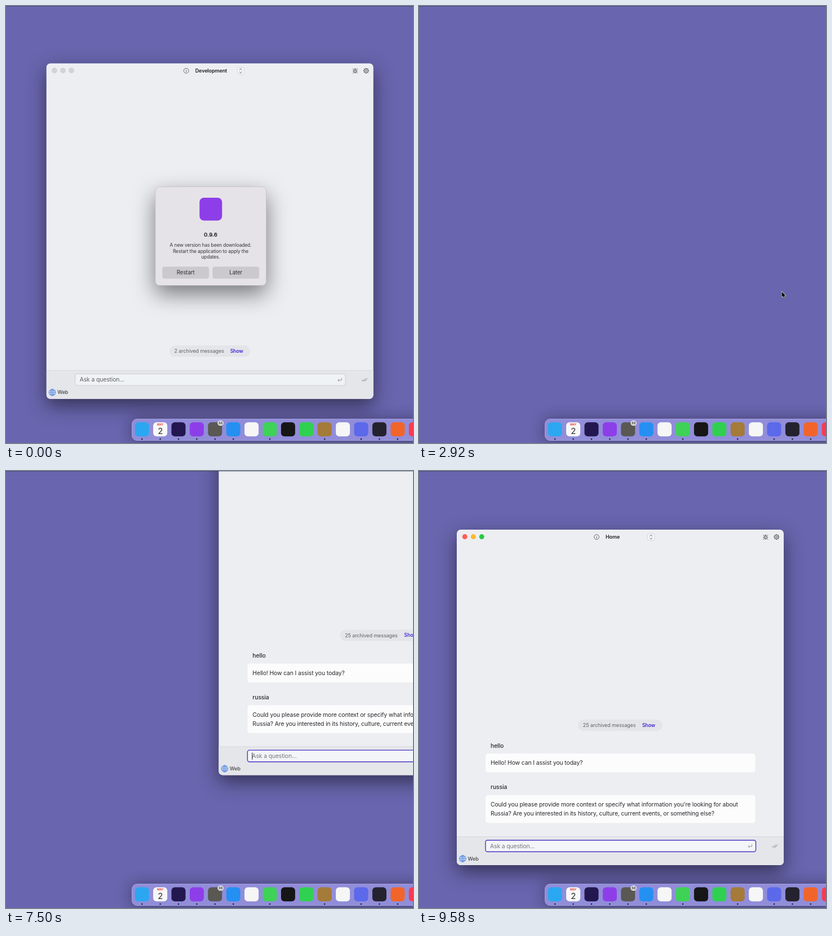
Animation of 722 by 775 pixels, one loop 9.98 s. Source, as an HTML page with a canvas:

```html
<!DOCTYPE html>
<html lang="en">
<head>
<meta charset="utf-8">
<title>Update and restart</title>
<style>
html, body { margin: 0; width: 100%; height: 100%; overflow: hidden; background: #6965ae; }
canvas { display: block; }
</style>
</head>
<body>
<canvas id="stage" width="722" height="775"></canvas>
<script>
const ctx = document.getElementById('stage').getContext('2d');
const LOOP = 9980;
const STEPS_PER_MS = 0.012;

// Times below are in steps of 1/12 s.
const ARRIVE = 13, REST = 19, PRESS = 25, DIALOG_GONE = 29, WINDOW_GONE = 30, LEFT = 36;
const REOPEN = 74, LOADED = 79, DRAG = 89, CURSOR_HIDE = 103, BLINK = 4;

const INK = '#29292d', ICON = '#4b4b50';

const mix = (a, b, p) => a + (b - a) * p;

// Share of the drag still to go: a quick pull that settles softly.
function dragLeft(k) {
  return Math.exp(-0.2386 * Math.max(0, k - DRAG) ** 1.52);
}

function windowPos(k) {
  const left = dragLeft(k);
  return [67 + 394 * left, 104 - 211 * left ** 1.17];
}

function cursorPos(k) {
  if (k < DIALOG_GONE) {
    const p = 1 - (1 - Math.min(1, (k - ARRIVE) / (REST - ARRIVE))) ** 2;
    return [mix(735, 325.5, p), mix(566, 478, p)];
  }
  if (k < LEFT) {
    const p = ((k - DIALOG_GONE) / 6) ** 2;
    return [mix(325.5, 643.5, p), mix(478, 506.5, p)];
  }
  // The window trails the hand that drags it.
  const [x, y] = windowPos(k), lag = dragLeft(k);
  return [x + 489 - 35 * lag, y + 13 + 32 * lag];
}

function box(x, y, w, h, r, fill, stroke, width = 1) {
  ctx.beginPath();
  ctx.roundRect(x, y, w, h, r);
  paint(fill, stroke, width);
}

function oval(x, y, rx, ry, fill, stroke, width = 1) {
  ctx.beginPath();
  ctx.ellipse(x, y, rx, ry, 0, 0, Math.PI * 2);
  paint(fill, stroke, width);
}

function disc(x, y, r, ...style) {
  oval(x, y, r, r, ...style);
}

function paint(fill, stroke, width) {
  if (fill) { ctx.fillStyle = fill; ctx.fill(); }
  if (stroke) { ctx.strokeStyle = stroke; ctx.lineWidth = width; ctx.stroke(); }
}

function line(color, width, ...pts) {
  ctx.beginPath();
  for (let i = 0; i < pts.length; i += 2) ctx.lineTo(pts[i], pts[i + 1]);
  paint(null, color, width);
}

// y is the middle of the lower-case letters
function text(str, x, y, size, color, weight = 400, align = 'left') {
  ctx.font = `${weight} ${size}px Inter, sans-serif`;
  ctx.letterSpacing = -0.012 * size + 'px';
  ctx.textAlign = align;
  ctx.fillStyle = color;
  ctx.fillText(str, x, y + size * 0.35);
}

function withShadow(blur, dy, alpha, draw) {
  ctx.save();
  ctx.shadowColor = `rgba(0,0,0,${alpha})`;
  ctx.shadowBlur = blur;
  ctx.shadowOffsetY = dy;
  draw();
  ctx.restore();
}

function at(x, y, draw) {
  ctx.save();
  ctx.translate(x, y);
  draw();
  ctx.restore();
}

function bug() {
  oval(0, 0.6, 2.4, 3.4, null, ICON, 0.9);
  line(ICON, 0.8, 0, -2, 0, 4);
  for (const side of [-1, 1]) {
    for (const tilt of [-1, 0, 1])
      line(ICON, 0.8, side * 2, 0.5 + tilt * 2, side * 4.6, 0.5 + tilt * 4.2);
    line(ICON, 0.8, 0, -3, side * 1.5, -4.5);
  }
}

function gear() {
  disc(0, 0, 3.6, null, ICON, 1);
  disc(0, 0, 1.4, null, ICON, 0.9);
  for (let a = 0; a < 8; a++) {
    const x = Math.cos(a * Math.PI / 4), y = Math.sin(a * Math.PI / 4);
    line(ICON, 1.4, x * 3.7, y * 3.7, x * 4.9, y * 4.9);
  }
}

function globe() {
  const blue = '#3f78d8';
  disc(0, 0, 5.8, '#e2ecfb', blue, 0.9);
  oval(0, 0, 2.6, 5.8, null, blue, 0.8);
  line(blue, 0.8, 0, -5.8, 0, 5.8);
  for (const y of [-3, 0, 3]) {
    const half = Math.sqrt(5.8 ** 2 - y * y);
    line(blue, 0.8, -half, y, half, y);
  }
}

function info() {
  disc(0, 0, 4.4, null, ICON, 0.8);
  line(ICON, 0.9, 0, -0.6, 0, 2.4);
  line(ICON, 0.9, 0, -2.5, 0, -1.6);
}

function stepper() {
  box(-6.2, -6.2, 12.5, 12.5, 3, '#f3f4f6', '#d0d1d5', 0.8);
  for (const dir of [-1, 1]) line(ICON, 0.9, -2.3, dir * 1.6, 0, dir * 3.8, 2.3, dir * 1.6);
}

function titleBar(title, active) {
  ['#fb5e55', '#fdbb2d', '#2ac840'].forEach((c, i) =>
    disc(14.3 + 15 * i, 12.6, 4.5, active ? c : '#d3d3d7', active ? null : '#c6c6ca', 0.6));
  at(248, 13, info);
  text(title, 264, 13, 9, '#202024', 600);
  at(344.6, 13.2, stepper);
  at(547.7, 13, bug);
  at(567.2, 13, gear);
}

function archive(count, left, y) {
  box(left, y - 10, 580 - 2 * left, 20, 10, '#e4e5e9');
  text(`${count} archived messages`, left + 8.8, y, 9, '#626267');
  text('Show', 580 - left - 36, y, 8.8, '#2a14d2', 500);
}

function footer(active, caret) {
  ctx.fillStyle = '#e5e6ea';
  ctx.fillRect(0, 545, 580, 50);
  line('#d6d7dc', 1, 0, 544.5, 580, 544.5);
  box(51, 550.7, 479.5, 20.6, 3.5, active ? '#f3f5f8' : '#eff3f6', active ? '#4836c4' : '#c8cbd1', active ? 1.4 : 1);
  text('Ask a question...', 59, 561, 10.4, active ? '#77777c' : '#606065');
  if (caret) line('#222226', 1, 59.5, 555, 59.5, 567.5);
  line('#8a8a90', 0.9, 523.5, 557.8, 523.5, 562, 517, 562);
  line('#8a8a90', 0.9, 519.4, 559.6, 517, 562, 519.4, 564.4);
  line('#77777c', 0.9, 559.5, 561.3, 561.5, 563.5, 566, 558.5);
  line('#77777c', 0.9, 563.8, 562.5, 564.8, 563.5, 569.3, 558.5);
  at(10.5, 583.5, globe);
  text('Web', 19.5, 583.5, 9, '#47474c', 500);
}

function exchange(y, question, answer) {
  text(question, 60, y, 10.4, INK, 500);
  box(51, y + 14, 478.5, 17.5 + 16 * answer.length, 5, '#fcfcfd');
  answer.forEach((s, i) => text(s, 60, y + 30.8 + 16 * i, 10.4, INK));
}

function messages() {
  archive(25, 215, 347);
  exchange(383, 'hello', ['Hello! How can I assist you today?']);
  exchange(456.8, 'russia', [
    "Could you please provide more context or specify what information you're looking for about",
    'Russia? Are you interested in its history, culture, current events, or something else?']);
}

function appWindow(x, y, content) {
  at(x, y, () => {
    withShadow(33, 12, 0.5, () => box(0, 0, 580, 595, 7, '#edeef2'));
    ctx.beginPath();
    ctx.roundRect(0, 0, 580, 595, 7);
    ctx.clip();
    content();
  });
}

function button(label, x, pressed) {
  box(x, 462.3, 82.8, 21.2, 4, pressed ? '#b9b7bb' : '#cbc9cd');
  text(label, x + 41.4, 472.8, 9.7, '#302f33', 400, 'center');
}

function dialog(pressed) {
  withShadow(38, 15, 0.5, () => box(265, 320.5, 196.5, 175, 7, '#e6e3e8'));
  box(265, 320.5, 196.5, 175, 7, null, '#c3c1c6', 0.8);
  box(343.3, 340, 40, 40.5, 8, '#8d3ee8');
  text('0.9.6', 363, 405.5, 9.6, '#29282c', 700, 'center');
  ['A new version has been downloaded.', 'Restart the application to apply the', 'updates.']
    .forEach((s, i) => text(s, 363, 424.3 + 10.5 * i, 8.4, '#343338', 400, 'center'));
  button('Restart', 277.3, pressed);
  button('Later', 366.3, false);
}

const dockColors = ['#2ba7f1', '#f8f8f8', '#22174f', '#8d3ee8', '#5a5853', '#2590f2', '#f6f6f6', '#3ed257',
  '#161617', '#30d150', '#a47b38', '#f6f6f6', '#5b69ea', '#25222f', '#f1652b', '#fa3a50'];
const idle = [6, 8, 9, 11];

function dock() {
  withShadow(26, 1, 0.35, () => box(223.5, 732.5, 540, 38, 9, '#938fdb', '#a9a5e6', 0.9));
  dockColors.forEach((c, i) => {
    const x = 241.2 + 32.4 * i;
    box(x - 12.5, 738.2, 25, 25, 6, c);
    if (!idle.includes(i)) disc(x, 768, 1.3, '#1d1b33');
  });
  text('MAY', 273.7, 742.6, 5, '#e5453c', 700, 'center');
  text('2', 273.7, 753.4, 15, '#2c2c30', 400, 'center');
  box(375.3, 735.2, 10.6, 9, 4.5, '#ececf0');
  text('88', 380.7, 739.8, 6, '#3a3a3e', 600, 'center');
}

const arrow = new Path2D('M0 0V10L2.3 7.9 3.8 11.3 5.5 10.6 4 7.2H7.1Z');

function cursor([x, y]) {
  at(x, y, () => {
    ctx.lineJoin = 'round';
    ctx.strokeStyle = '#fff';
    ctx.lineWidth = 1.2;
    withShadow(2, 1, 0.3, () => ctx.stroke(arrow));
    ctx.fillStyle = '#080808';
    ctx.fill(arrow);
  });
}

function render(k) {
  ctx.fillStyle = '#6965ae';
  ctx.fillRect(0, 0, 722, 775);

  if (k < WINDOW_GONE) {
    appWindow(71.7, 101.8, () => {
      titleBar('Development', false);
      archive(2, 218, 510.3);
      footer(false, false);
    });
    if (k < DIALOG_GONE) dialog(k >= PRESS);
  } else if (k >= REOPEN) {
    const caret = Math.floor((k - LOADED) / BLINK) % 2 === 0;
    appWindow(...windowPos(k), () => {
      if (k < LOADED) return;
      titleBar('Home', true);
      messages();
      footer(true, caret);
    });
  }

  ctx.fillStyle = 'rgba(40,38,70,.45)';
  ctx.fillRect(0, 0, 722, 1);
  dock();
  if (k >= ARRIVE && k < LEFT || k >= DRAG && k < CURSOR_HIDE) cursor(cursorPos(k));
}

const start = performance.now();
function tick() {
  const ms = (performance.now() - start) % LOOP;
  render(Math.floor(ms * STEPS_PER_MS + 0.05));
  requestAnimationFrame(tick);
}
tick();
</script>
</body>
</html>
```
